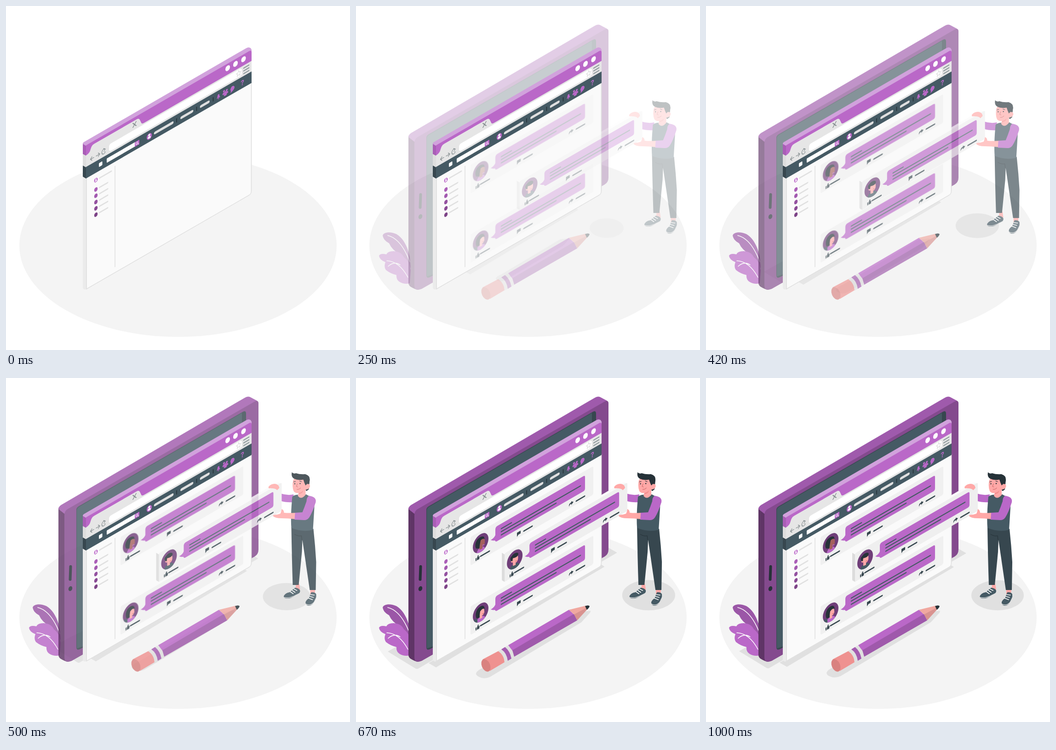
An HTML page for the animation above (1040 ms loop, 748 by 748 pixels).

```html
<!DOCTYPE html>
<html lang="en">
<head>
<meta charset="utf-8">
<title>Social feed</title>
<style>
  html, body { margin: 0; width: 100%; height: 100%; overflow: hidden; background: #fff; }
  svg { display: block; width: 100vw; height: 100vh; }
  .line { fill: none; stroke-linecap: round; stroke-linejoin: round; }
</style>
</head>
<body>
<svg viewBox="0 0 748 748">
  <defs>
    <clipPath id="disc"><ellipse rx="17" ry="19.6"/></clipPath>
    <!-- Post contents in the sheared plane of the browser window -->
    <g id="post">
      <path fill="#ba68c8" d="M134-217.500H320Q324-217.500 324-214V-189Q324-184.500 320-184.500H132Q129-185 128-189Q124-190 119-195Q127-195 129-200V-212Q129-217.500 134-217.500Z"/>
      <path class="line" stroke="#455a64" stroke-width="2.6" d="M142-206.500H164M142-200H314M142-193H261"/>
      <path class="line" stroke="#37474f" stroke-width="3" d="M97-172.500H116M191-173H209M305-172.500H323"/>
      <path fill="#37474f" d="M86-174h2v6h-2zM89-173l2-5 2 1-1 3h3l-1 6h-5zM176-178h8v6h-5l-3 3z"/>
      <path fill="#37474f" d="M294-178l5 4-5 4v-3q-4 0-5 4-1-7 5-7z"/>
      <ellipse cx="97" cy="-201" rx="17" ry="19.6" fill="#6f3e78"/>
    </g>
    <g id="person">
      <circle cy="-2.6" r="2.2"/>
      <path d="M-3.3 4Q-3.5 0 0 0T3.3 4Q0 6-3.3 4Z"/>
    </g>
  </defs>

  <ellipse cx="374" cy="521" rx="345" ry="198.5" fill="#f4f4f4"/>

  <g id="shadows" fill="#e0e0e0">
    <path d="M72 594L114 570 540 366 566 381 137 631Q134 632 131 630Z"/>
    <path d="M160 619L528 404 539 411 176 628Z"/>
    <path d="M262 641Q265 633 280 628L478 510 509 506 508 510 489 531 293 648Q280 654 270 649Q262 646 262 641Z"/>
    <ellipse cx="634" cy="472.5" rx="57" ry="32.7"/>
  </g>

  <g class="fade">
    <path fill="#9b57a7" d="M58 499C60 491 76 490 88 496 102 504 112 522 117 545L119 570Q108 551 95 540 78 530 72 516 60 510 58 499Z"/>
    <path fill="#ba68c8" d="M50 543Q53 537 66 540 69 533 82 533 98 534 104 546 117 556 119 575L117 603Q105 606 95 600 87 595 88 585 75 582 65 574 60 567 64 557 51 552 50 543Z"/>
    <path class="line" stroke="#fff" stroke-width="1.5" d="M69 499Q98 506 117 556M67 554Q94 555 113 590M70 566Q83 554 96 563"/>
  </g>

  <g class="fade">
    <path fill="#5f3566" d="M114 282L128 288V609L137 617Q131 618 118 610 114 607 114 601Z"/>
    <path fill="#9f5aac" d="M114 285Q114 280 120 276L520 42.500Q526 39 531 41.500L545 49Q549 51 549 56L540 58 128 296Z"/>
    <path fill="#844a8e" d="M127 298Q127 289 134 285L541 51Q549 47 549 56V373Q549 383 541 388L143 615Q128 621 127 609Z"/>
    <path fill="#37474f" d="M153 287Q153 282 158 279L516 73Q522 70 522 78V400L160 590Q153 593 153 585Z"/>
    <path fill="#455a64" d="M154 288Q154 283 159 280L513 76V395L166 584 154 588Z"/>
    <g fill="#263238">
      <rect x="137" y="407" width="6" height="34" rx="3" transform="rotate(2 140 424)"/>
      <ellipse cx="140" cy="458" rx="4" ry="5.500" transform="rotate(20 140 458)"/>
    </g>
  </g>

  <g id="browser">
    <path fill="#ebebeb" d="M167 371L175 375V616Q167 618 167 611Z"/>
    <path fill="#a95eb6" d="M167 298L174.500 302V326L167 322Z"/>
    <path fill="#dedede" d="M167 322L174.500 326V351L167 347Z"/>
    <path fill="#37474f" d="M167 347L174.500 351V375.500L167 371Z"/>
    <path fill="#d1a2dc" d="M167 300Q167 297 170 295.500L521 92.500Q527 88 532 91.500L534 95V105L174 304Z"/>
    <g transform="translate(174 616) skewY(-30)">
      <path fill="#fafafa" stroke="#e0e0e0" stroke-width="1.700" d="M1-242H359.500V-6Q359.500 0 354 0H1Z"/>
      <path fill="#ba68c8" d="M0-313H354Q360-313 360-307V-288H0Z"/>
      <path fill="#e6e6e6" d="M0-291Q8-291 10-299 12-306 18-306H110Q115-306 117-301L120-293Q121-289 126-289H360V-265H0Z"/>
      <rect y="-266" width="360" height="25" fill="#455a64"/>
      <g fill="#fff">
        <ellipse cx="308" cy="-303" rx="5" ry="5.800"/>
        <ellipse cx="325" cy="-302.500" rx="5" ry="5.800"/>
        <ellipse cx="342.500" cy="-302.500" rx="5" ry="5.800"/>
        <rect x="50" y="-286" width="289" height="16" rx="5"/>
        <rect x="28" y="-258" width="7.500" height="8.500" rx="1.500"/>
        <rect x="45" y="-258.500" width="63" height="9.500" rx="1.500"/>
      </g>
      <path class="line" stroke="#909c9e" stroke-width="2.500" d="M343-283H354M343-277H354M343-271H354"/>
      <path class="line" stroke="#8e9698" stroke-width="1.400" d="M17-277H9.500M13-281L9.500-277 13-273M22-277H30M26.500-281L30-277 26.500-273M41-281A4 5 0 1 0 42-275M38-284L42-281 39-277"/>
      <path class="line" stroke="#858d90" stroke-width="1.700" d="M102-302L109-293M109-302L102-293"/>
      <path class="line" stroke="#d5d5d5" stroke-width="1" d="M332-284L333.500-280 337-279.500 334.500-277 335-272.500 332-275 328.500-272.500 329.500-277 327-279.500 330.500-280Z"/>
      <rect x="106" y="-258.500" width="10" height="10" rx="1" fill="#ba68c8"/>
      <ellipse cx="110.500" cy="-254" rx="2.200" ry="2.500" fill="none" stroke="#fff"/>
      <path class="line" stroke="#fff" d="M112-252L114-250"/>
      <ellipse cx="137.500" cy="-253" rx="5.700" ry="6.600" fill="#ba68c8"/>
      <use href="#person" x="137.500" y="-253.500" fill="#fff"/>
      <path class="line" stroke="#e0e0e0" stroke-width="5.800" d="M150.500-253.500H187.500M208-253.500H230.500M250.500-253.500H266"/>
      <path stroke="#263238" stroke-width="1.600" d="M197-258v9M240.500-258v9M276.500-258v9"/>
      <g fill="#ba68c8">
        <path d="M284-250Q286-252 286-256 288-260 290-256 290-252 292-250ZM286-249h4l-2 2Z"/>
        <use href="#person" x="300" y="-255"/>
        <use href="#person" x="306" y="-254"/>
        <use href="#person" x="303" y="-251"/>
        <path d="M315-249L314-245 318-247Q323-249 323-254 321-259 317-258 312-254 315-249Z"/>
        <text x="340" y="-247.500" font-family="Roboto, Arial, sans-serif" font-size="15" font-weight="700" text-anchor="middle">?</text>
        <ellipse cx="21.500" cy="-225" rx="3.900" ry="4.500"/>
      </g>
      <use href="#person" fill="#fff" transform="translate(21.500 -225.300) scale(.65)"/>
      <path class="line" stroke="#e0e0e0" stroke-width="3" d="M29.500-225H55"/>
      <g id="contacts"></g>
      <path stroke="#e0e0e0" stroke-width="1.600" d="M63-232V-12"/>
    </g>
  </g>

  <g class="fade" transform="translate(174 616) skewY(-30)">
    <g>
      <rect x="75" y="-227" width="267" height="62" rx="3" fill="#f0f0f0"/>
      <use href="#post"/>
      <g transform="translate(97 -201)" clip-path="url(#disc)">
        <path fill="#263238" d="M-10 6Q-14-4-8-11 0-16 7-10 10-3 8 6L0 12Z"/>
        <path fill="#ba68c8" d="M-9 22Q-9 10 0 9 10 9 11 24Z"/>
        <path fill="#a4605c" d="M0-6Q6-8 9-3L9 5Q7 10 4 9L4 14-3 13-2 4Z"/>
        <path class="line" stroke="#ba68c8" stroke-width="1.500" d="M4 7L8 8"/>
      </g>
    </g>
    <g transform="translate(0 151)">
      <rect x="75" y="-227" width="267" height="62" rx="3" fill="#f0f0f0"/>
      <use href="#post"/>
      <g transform="translate(97 -201)" clip-path="url(#disc)">
        <path fill="#263238" d="M-9 8Q-13-4-7-11 0-16 6-11 10-6 8 2L0 10Z"/>
        <path fill="#ba68c8" d="M-12 22Q-10 9 0 9 11 9 12 24Z"/>
        <path fill="#455a64" d="M-14 20V6L-7 11V22Z"/>
        <path fill="#ffa8a7" d="M-1-3Q5-8 8-3L8 4Q6 9 3 8L4 13-2 13-2 4Z"/>
        <path class="line" stroke="#b95d62" stroke-width="1" d="M4 5L6 5"/>
      </g>
    </g>
  </g>

  <g class="fade">
    <path fill="#ef9290" d="M275 612L311 593Q322 600 323 618L291 637Z"/>
    <ellipse cx="282.500" cy="625" rx="9" ry="14.200" transform="rotate(-24 282.500 625)" fill="#d98280"/>
    <path fill="#e0e0e0" d="M309 594L331 581Q342 589 344 606L323 619Q322 602 309 594Z"/>
    <path fill="#a45bb0" d="M316 590L324 585Q335 594 338 610L330 615Q328 598 316 590Z"/>
    <path fill="#ba68c8" d="M331 581L463 504 478 518 341 594Z"/>
    <path fill="#9f59ab" d="M340 592L474 513 481 527 344 606Z"/>
    <path fill="#f0a8a0" d="M463 504L500 495 504 501 474 514Z"/>
    <path fill="#d99390" d="M474 514L503 499 502 504 481 527Z"/>
    <path fill="#263238" d="M498 496Q505 493 508 496 507 500 502 504Z"/>
  </g>

  <g id="carrier" class="fade">
    <path fill="#ffa8a7" d="M622 447H629L631 460 621 461ZM653 458H664L663 471 653 472Z"/>
    <g fill="#455a64">
      <path d="M596 473Q600 467 608 466L620 456Q629 457 631 462 632 469 622 472 610 481 599 479 594 477 596 473Z"/>
      <path d="M643 487Q645 482 650 479L655 466Q663 465 666 470 667 480 661 488 656 496 648 495 642 493 643 487Z"/>
    </g>
    <path class="line" stroke="#fff" stroke-width="1.700" d="M610 465L616 469M614 462L620 466M618 459L624 462M650 479L658 482M652 475L660 477M654 471L662 472"/>
    <path class="line" stroke="#e6e6e6" stroke-width="1.200" d="M596 477Q608 480 622 472L630 468M643 491Q652 497 661 488L666 478"/>
    <path fill="#37474f" d="M612 325L660 328Q664 365 666 400L665 461H652L636 352 635 378 628 450H615Q613 390 612 325Z"/>
    <path class="line" stroke="#263238" stroke-width="1" d="M619 340Q628 345 634 343L635 352"/>
    <path fill="#ba68c8" d="M588 251Q604 256 617 253L615 270Q600 271 588 267Z"/>
    <path fill="#455a64" d="M614 258Q621 253 628 254L644 253 655 259Q663 268 662 282L659 330Q637 336 612 326 610 300 614 258Z"/>
    <path fill="#263238" d="M640 215L652 220 651 232 650 242 645 246 640 240Z"/>
    <path fill="#ffa8a7" d="M616 222Q613 236 617 246 620 251 628 250L626 256Q633 266 643 254L643 243 649 241Q655 236 651 231 646 228 644 233L641 219 622 215Z"/>
    <path fill="#f28f8f" d="M628 250Q635 248 638 244 637 252 627 253Z"/>
    <path fill="#263238" d="M613 205Q617 209 622 207 631 210 642 209 653 212 652 222 651 228 649 231 645 228 643 234 640 228 638 221 626 223 618 219 611 215 613 205Z"/>
    <g fill="#263238"><circle cx="619.500" cy="230" r="1.300"/><circle cx="631" cy="229.500" r="1.300"/></g>
    <path class="line" stroke="#263238" stroke-width="1.200" d="M617 226L621 225M630 224L634 225.500"/>
    <path class="line" stroke="#d36f70" stroke-width="1.200" d="M625 230L623 236 626 237M624 242Q629 243 632 239"/>

    <path fill="#fafafa" d="M318 384Q318 379 322 377L577 229.500Q582 226 586 228L591 231 588 238 324 389Z"/>
    <path fill="#dcdcdc" d="M318 380L324.500 384V443.500L319 440.500Q318 440 318 438Z"/>
    <g transform="translate(249 651.500) skewY(-30)">
      <path fill="#efefef" d="M78-227H339Q342-227 342-224V-168Q342-165 339-165H75V-224Q75-227 78-227Z"/>
      <use href="#post"/>
      <g transform="translate(97 -201)" clip-path="url(#disc)">
        <path fill="#455a64" d="M-12 24Q-12 10-3 9L5 10Q12 14 12 26Z"/>
        <path fill="#ffa8a7" d="M-5-5L6-6Q8-2 7 4 5 9 2 8L2 13-4 12-4 4Q-9 3-8-1Z"/>
        <path fill="#263238" d="M-8-1Q-12-9-6-11 0-16 7-10 9-7 6-4 2-2-4-5L-5 1Z"/>
        <path class="line" stroke="#b95d62" stroke-width="1" d="M2 5L4 5"/>
      </g>
    </g>

    <path fill="#ffa8a7" d="M562 237Q567 230 576 230 585 231 586 239L581 244Q577 239 563 240Z"/>
    <path fill="#ffa8a7" d="M622 293V307Q604 305 591 305 576 305 572 300 571 297 581 297L588 295Q590 291 591 285 596 287 596 293Q607 294 622 293Z"/>
    <path fill="#ba68c8" d="M650 256Q667 258 665 270 658 292 651 303 647 309 640 309L619 308 620 293 636 292Q641 280 645 268 645 260 650 256Z"/>
  </g>
</svg>

<script>
  const LOOP = 1040, FPS = 24, LEAD = 0.037;
  const SLIDE = 45;
  const ORIGIN = [381, 502];

  const fading = document.querySelectorAll('.fade');
  const shadows = document.getElementById('shadows');
  const carrier = document.getElementById('carrier');

  const tones = ['#ab5fb8', '#a35ab0', '#9452a0', '#894a94', '#7d4487'];
  document.getElementById('contacts').innerHTML = tones.map((tone, i) => {
    const y = -204.7 + i * 13.7;
    return `<ellipse cx="21.5" cy="${y}" rx="3.7" ry="4.5" fill="${tone}"/>
      <path class="line" stroke="#e0e0e0" stroke-width="3" d="M29.5 ${y}H47"/>`;
  }).join('');

  const bezier = (a, b, u) => 3 * a * u * (1 - u) ** 2 + 3 * b * u * u * (1 - u) + u ** 3;

  // cubic-bezier(.36, -.01, .5, 1.38), overshooting before it settles
  function ease(x) {
    if (x <= 0) return 0;
    if (x >= 1) return 1;
    let low = 0, high = 1;
    for (let i = 0; i < 24; i++) {
      const mid = (low + high) / 2;
      if (bezier(0.36, 0.5, mid) < x) low = mid; else high = mid;
    }
    return bezier(-0.01, 1.38, low);
  }

  function render(ms) {
    const step = Math.floor((ms % LOOP + 6) * FPS / 1000);
    const p = step < 2 ? 0 : ease(step / FPS + LEAD);
    const opacity = Math.max(0, Math.min(1, p));
    const scale = 0.5 + 0.5 * p;
    const [x, y] = ORIGIN;
    fading.forEach(el => el.setAttribute('opacity', opacity));
    shadows.setAttribute('opacity', opacity);
    shadows.setAttribute('transform', `translate(${x} ${y}) scale(${scale}) translate(${-x} ${-y})`);
    carrier.setAttribute('transform', `translate(${SLIDE * (1 - p)} 0)`);
  }

  const start = performance.now();
  function tick() {
    render(performance.now() - start);
    requestAnimationFrame(tick);
  }
  tick();
</script>
</body>
</html>
```
